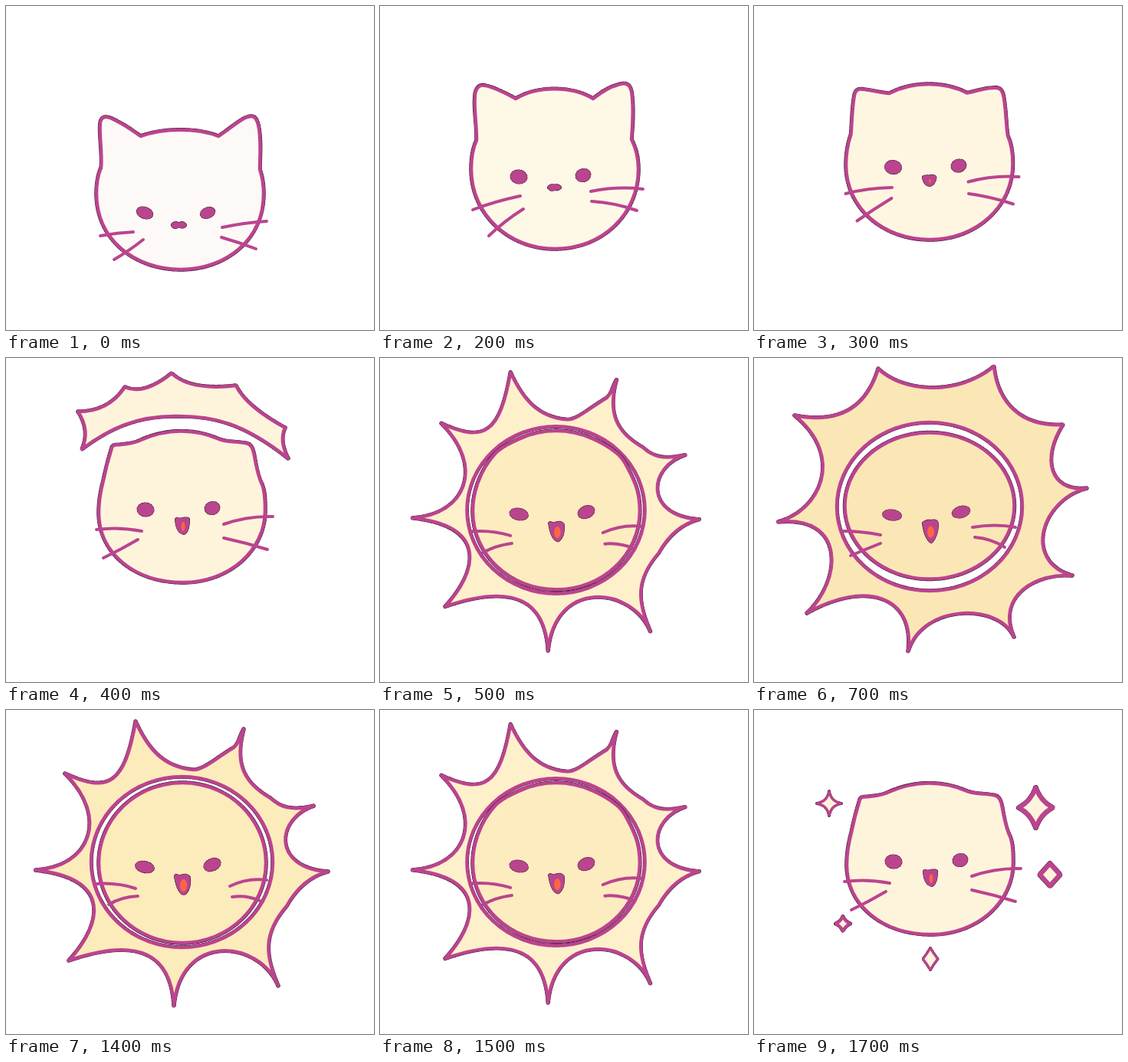
Recreate the animation shown at these times as an HTML page with a canvas. Size 480 by 423 pixels, loop 1800 ms.

```html
<!DOCTYPE html>
<html>
<head>
<meta charset="utf-8">
<style>
html, body { margin: 0; height: 100%; overflow: hidden; background: #fff; }
canvas { display: block; }
</style>
</head>
<body>
<canvas id="stage" width="480" height="423"></canvas>
<script>
const ctx = document.getElementById('stage').getContext('2d');
const INK = '#bb448f', EDGE = '#35152b', TONGUE = '#fb6545', CREAM = '#fdf4db';
const LINE = 4.5;

const mix = (a, b, k) => a + (b - a) * k;
const mixList = (a, b, k) => a.map((v, i) => mix(v, b[i], k));

// Blend two path strings that share the same commands
function mixPath(a, b, k) {
  const other = b.match(/[\d.]+/g);
  let i = 0;
  return a.replace(/[\d.]+/g, n => mix(+n, +other[i++], k).toFixed(2));
}

// Ellipse cut at the same places as the cat's head outline
function roundHead(cx, cy, rx, ry) {
  const stops = [200, 225, 235, 245, 295, 315, 325, 340, 360, 450, 540, 560].map(d => d * Math.PI / 180);
  const at = (a, k) => [cx + rx * (Math.cos(a) - k * Math.sin(a)), cy + ry * (Math.sin(a) + k * Math.cos(a))].map(v => v.toFixed(2)).join();
  let d = 'M' + at(stops[0], 0);
  for (let i = 1; i < stops.length; i++) {
    const a = stops[i - 1], b = stops[i], k = 4 / 3 * Math.tan((b - a) / 4);
    d += ` C${at(a, k)} ${at(b, -k)} ${at(b, 0)}`;
  }
  return d;
}

// eyes: x, y, rx, ry, tilt in degrees; tongue: x, y, rx, ry
const tallCat = {
  fill: [252, 249, 246],
  head: 'M124,211 C126,195 121,165 123,152 C125,140 137,146 146,151 C158,157 168,165 176,170 C205,159 250,159 277,170 C288,163 298,154 310,147 C322,141 327,143 330,160 C333,180 331,200 331,213 C334,222 336,232 336,245 C336,305 287,344 228,344 C168,344 118,305 118,245 C118,232 120,220 124,211',
  whiskers: 'M123,300 Q145,296 166,295 M141,331 Q160,320 179,305 M282,289 Q310,283 340,281 M281,302 Q305,309 326,317',
  nose: 'M218,286 Q221,282 225,286 Q230,282 233,286 Q231,289 225,286 Q220,290 218,286',
  left: [181, 270, 11, 7.5, 20], right: [263, 270, 10, 7, -22], tongue: [226, 286, 0, 0]
};
const roundCat = {
  fill: [254, 248, 230],
  head: 'M126,175 C126,150 122,135 124,115 C127,100 135,103 145,106 C156,110 168,116 177,121 C205,104 250,104 278,121 C288,113 298,106 310,103 C324,98 328,104 329,120 C331,140 329,160 328,174 C334,186 337,198 337,213 C337,272 290,317 228,317 C168,317 119,272 119,213 C119,198 121,186 126,175',
  whiskers: 'M121,266 Q150,255 183,248 M142,300 Q163,280 187,265 M275,242 Q310,235 343,239 M276,255 Q307,257 335,267',
  nose: 'M221,237 Q224,234 227,236 Q231,234 234,237 Q231,239 227,238 Q224,240 221,237',
  left: [181, 223, 11, 9, 8], right: [265, 221, 10, 8.5, -15], tongue: [228, 237, 0, 0]
};
const flatCat = {
  fill: [253, 244, 219],
  head: 'M127,160 C130,145 134,130 138,117 C140,112 145,114 150,113 C160,112 168,111 176,107 C210,92 246,92 278,106 C290,110 300,109 312,111 C320,112 322,118 324,128 C327,145 329,155 334,165 C338,175 338,188 338,199 C338,252 290,293 231,293 C168,293 121,255 121,202 C121,188 123,175 127,160',
  whiskers: 'M118,224 Q147,220 177,226 M127,261 Q150,250 172,237 M284,217 Q315,206 348,207 M284,235 Q312,241 341,250',
  nose: 'M223,211 Q227,212 231,211 Q235,210 237,211 Q237,224 232,228 Q224,226 223,211',
  left: [182, 198, 11, 9, 5], right: [269, 196, 10, 8.5, -15], tongue: [231, 220, 2.5, 6]
};
const sunFace = {
  fill: [252, 235, 187],
  head: roundHead(230, 199.5, 109, 104.5),
  whiskers: 'M118,227 Q145,225 169,233 M134,254 Q150,244 172,243 M292,230 Q315,219 340,222 M295,244 Q313,241 331,249',
  nose: 'M222,217 Q226,219 231,217 Q236,216 238,219 Q239,234 232,239 Q225,236 222,217',
  left: [181, 205, 12.5, 7.5, 12], right: [269, 202, 11.5, 8, -24], tongue: [231.5, 229, 4.5, 8]
};
const wideFace = {
  fill: [250, 231, 181],
  head: roundHead(229, 193, 110.5, 95.5),
  whiskers: 'M114,226 Q140,226 165,231 M126,258 Q145,250 165,242 M285,221 Q315,216 341,221 M288,234 Q310,236 327,247',
  nose: 'M222,216 Q226,213 231,214 Q238,212 238,217 Q238,230 231,239 Q224,232 222,216',
  left: [180, 205, 12.5, 7, 7], right: [270, 201, 12, 7.5, -15], tongue: [230.5, 227, 4.5, 7.5]
};

const crown = 'M94,70 Q134,70 155,38 Q180,49 216,20 Q240,43 300,36 Q313,63 364,91 Q356,108 368,131 C310,85 270,75 220,76 C170,76 135,92 99,119 Q110,95 94,70Z';
const sun = {
  rays: 'M169,15 C185,50 205,75 245,78 C258,78 275,62 297,49 C304,43 303,38 310,25 C298,70 310,95 345,115 C358,127 372,132 402,125 C352,141 346,206 420,211 C392,218 375,240 366,256 C335,292 338,320 355,360 C330,300 228,290 219,386 C215,320 175,295 82,327 C125,280 140,220 38,209 C110,205 135,140 77,83 C135,110 155,95 169,15Z',
  ring: [229.5, 198.5, 118.5, 111.5]
};
const bigSun = {
  rays: 'M162,14 C195,45 265,50 313,11 C318,60 350,90 403,87 C375,130 385,175 434,170 C375,185 350,265 415,284 C370,280 315,310 339,364 C320,320 220,320 201,383 C210,310 145,290 69,333 C115,290 120,205 31,214 C85,200 120,130 53,75 C105,85 145,70 162,14Z',
  ring: [229, 194, 121, 110]
};
// x, y, rx, ry, line width, pinch (0.5 is a straight diamond)
const sparkles = [
  [98, 122, 16, 16, 3, .13], [367.5, 127.5, 22, 26, 6, .3], [386, 215, 13, 14.5, 6, .5],
  [230, 325, 9.5, 14, 3, .46], [116, 279, 9.5, 9.5, 4, .3]
];

function mixPose(a, b, k) {
  const pose = {};
  for (const key in a) pose[key] = (typeof a[key] === 'string' ? mixPath : mixList)(a[key], b[key], k);
  return pose;
}

const oval = ([x, y, rx, ry, tilt = 0]) => {
  const p = new Path2D();
  p.ellipse(x, y, rx, ry, tilt * Math.PI / 180, 0, 7);
  return p;
};

function stroke(path, color, width) {
  ctx.strokeStyle = color;
  ctx.lineWidth = width;
  ctx.stroke(path);
}

// Filled outline with a rough dark rim
function shape(path, fill, width) {
  ctx.setLineDash([2, 2]);
  stroke(path, EDGE, width + 1);
  ctx.setLineDash([]);
  ctx.fillStyle = fill;
  ctx.fill(path, 'evenodd');
  stroke(path, INK, width);
}

function drawFace(pose) {
  shape(new Path2D(pose.head), `rgb(${pose.fill})`, LINE);
  stroke(new Path2D(pose.whiskers), INK, 4);
  for (const [x, y, rx, ry, tilt] of [pose.left, pose.right])
    shape(oval([x, y, rx - 1, ry - 1, tilt]), INK, 2);
  shape(new Path2D(pose.nose), INK, 5);
  ctx.fillStyle = TONGUE;
  ctx.fill(oval(pose.tongue));
}

function drawSun({ rays, ring }, fill, scale = 1) {
  ctx.save();
  ctx.translate(ring[0], ring[1]);
  ctx.scale(scale, scale);
  ctx.translate(-ring[0], -ring[1]);
  const path = new Path2D(rays);
  path.addPath(oval(ring));
  shape(path, fill, LINE);
  ctx.restore();
}

function drawSparkles(scale) {
  for (const [x, y, rx, ry, w, pinch] of sparkles) {
    const a = rx * scale, b = ry * scale, u = a * pinch, v = b * pinch;
    shape(new Path2D(`M${x},${y - b} Q${x + u},${y - v} ${x + a},${y} Q${x + u},${y + v} ${x},${y + b} Q${x - u},${y + v} ${x - a},${y} Q${x - u},${y - v} ${x},${y - b}Z`), CREAM, w);
  }
}

const growing = () => {
  drawSun(sun, '#fdf0cb', .98);
  drawFace(mixPose(flatCat, sunFace, .85));
};
const shining = () => {
  drawSun(sun, '#fcebbb');
  drawFace(sunFace);
};
const sparkling = scale => () => {
  drawFace(flatCat);
  drawSparkles(scale);
};

const steps = [
  () => drawFace(tallCat),
  () => drawFace(mixPose(tallCat, roundCat, .5)),
  () => drawFace(roundCat),
  () => drawFace(mixPose(roundCat, flatCat, .5)),
  () => { shape(new Path2D(crown), CREAM, LINE); drawFace(flatCat); },
  growing,
  shining,
  () => { drawSun(bigSun, '#fae7b5'); drawFace(wideFace); },
  shining,
  growing,
  sparkling(1.2),
  sparkling(1)
];

ctx.lineJoin = ctx.lineCap = 'round';
function draw() {
  const t = performance.now() % 1800;
  const step = Math.floor((t < 700 ? t : Math.max(700, t - 600)) / 100);
  ctx.clearRect(0, 0, 480, 423);
  steps[step]();
  requestAnimationFrame(draw);
}
draw();
</script>
</body>
</html>
```
